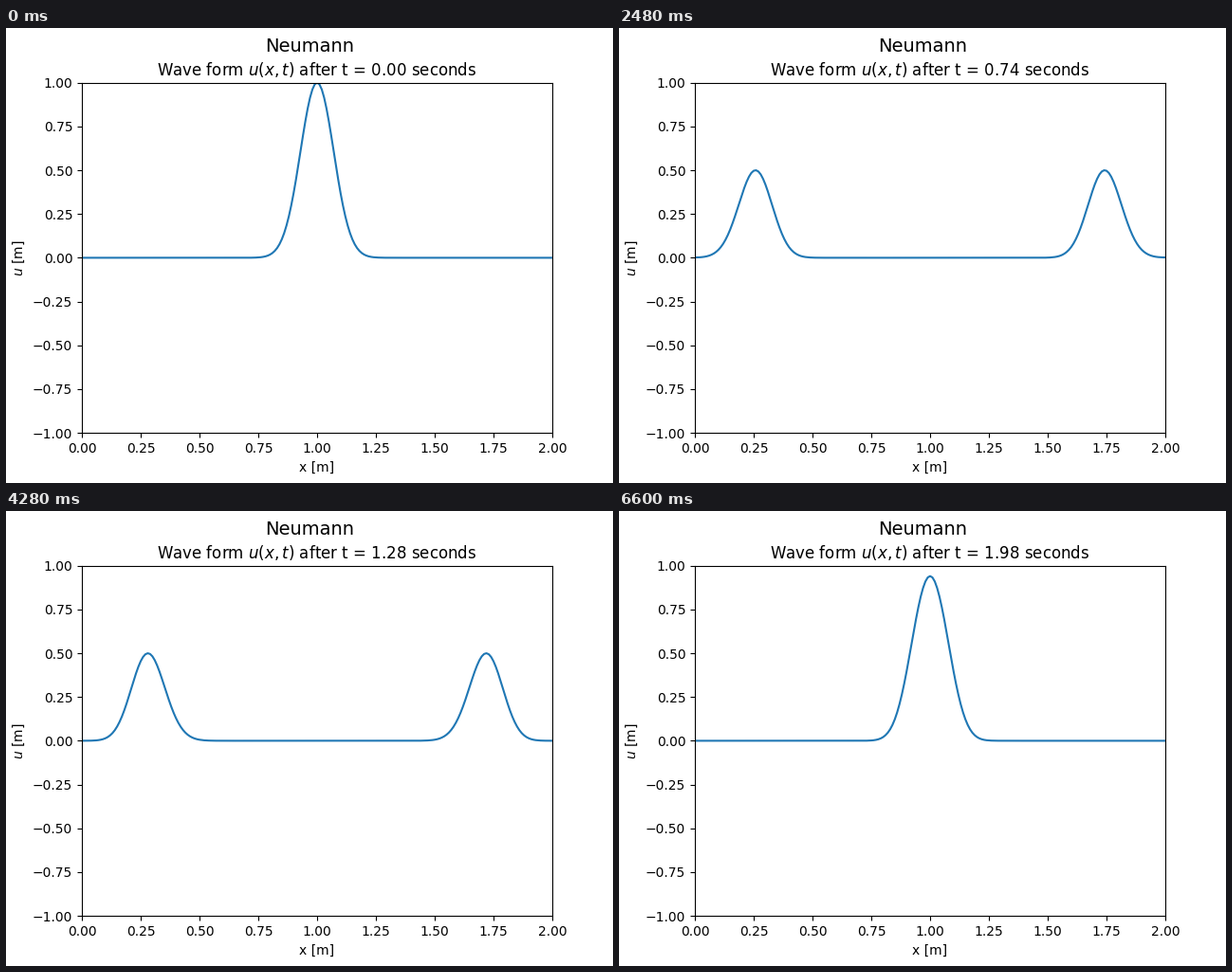
Write a matplotlib script that moves like this. It is 640 by 480 pixels and loops after 6640 ms.

```python
import numpy as np
import matplotlib.pyplot as plt
from matplotlib.animation import FuncAnimation

plt.rcParams.update({
    "font.family": "DejaVu Sans",
    "text.kerning_factor": 6,  # unkerned text
    "axes.titlepad": 5.3,
})

LENGTH = 2.0
DX = 0.01
DT = 0.001
SPEED = 1.0
FRAMES = 166
STEPS = 12  # time steps per frame


def laplacian(u):
    """Second difference with mirrored (zero-slope) ends."""
    p = np.pad(u, 1, mode="reflect")
    return p[2:] - 2 * u + p[:-2]


def solve(x):
    """Leapfrog solution of the wave equation, one row per frame."""
    c2 = (SPEED * DT / DX) ** 2
    u = np.exp(-100 * (x - 1) ** 2)
    prev = u + 0.5 * c2 * laplacian(u)  # starts at rest
    rows = []
    for n in range(FRAMES * STEPS):
        if n % STEPS == 0:
            rows.append(u)
        prev, u = u, 2 * u - prev + c2 * laplacian(u)
    return rows


x = np.linspace(0, LENGTH, round(LENGTH / DX) + 1)
waves = solve(x)

fig, ax = plt.subplots(figsize=(6.4, 4.8), dpi=100)
fig.suptitle("Neumann", fontsize=14)
ax.set(xlim=(0, LENGTH), ylim=(-1, 1), xlabel="x [m]", ylabel="$u$ [m]")
line, = ax.plot(x, waves[0], color="tab:blue", lw=1.5)
title = ax.set_title("")


def draw(i):
    line.set_ydata(waves[i])
    t = i * STEPS * DT
    title.set_text(f"Wave form $u(x,t)$ after t = {t:.2f} seconds")
    return line, title


anim = FuncAnimation(fig, draw, frames=FRAMES, interval=40,
                     repeat=True, repeat_delay=0, blit=False)
plt.show()
```
